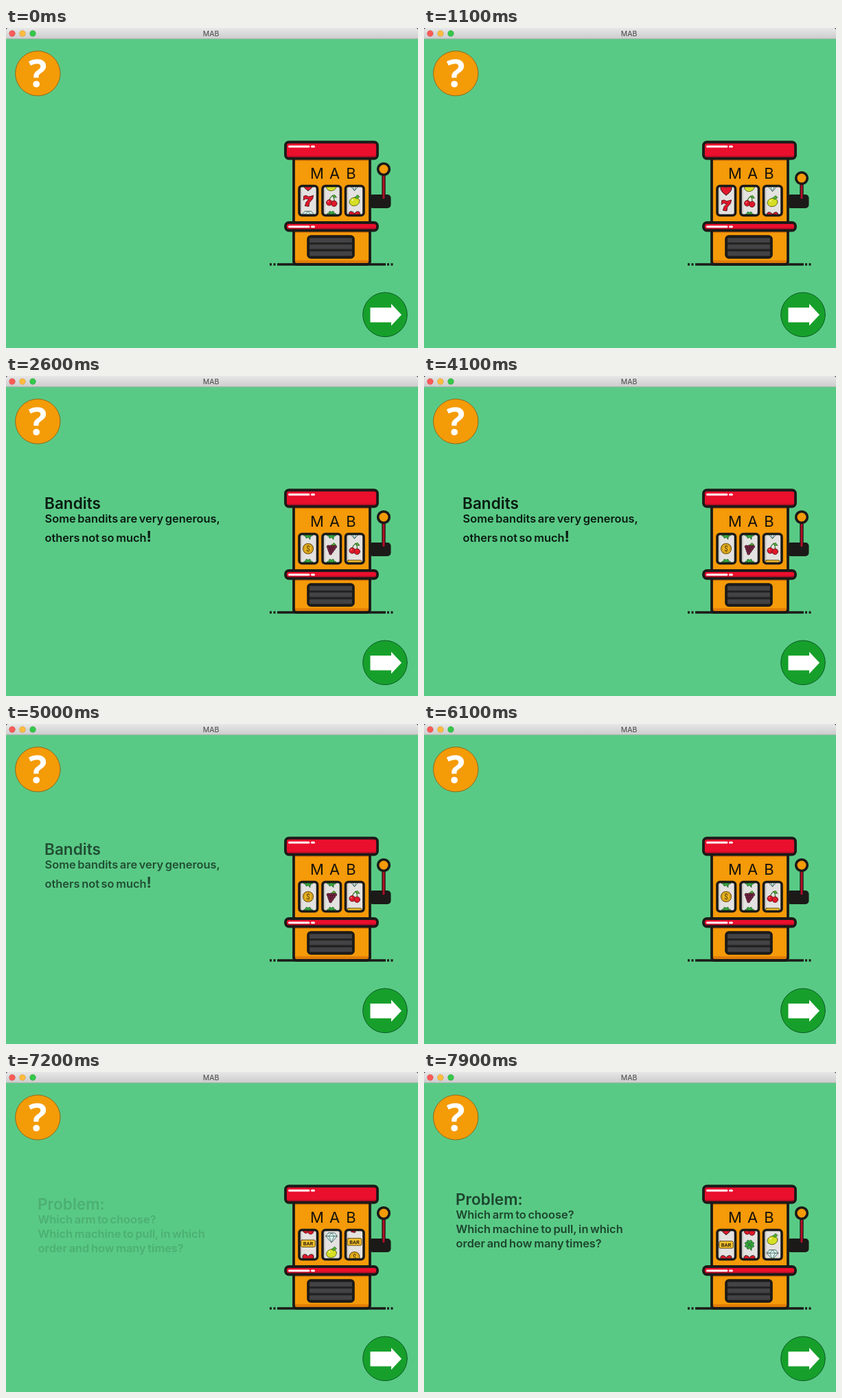
These frames come from a looping animation (600 px wide and 467 px high, 8 s). An HTML page with a canvas:

```html
<!DOCTYPE html>
<html lang="en">
<head>
<meta charset="utf-8">
<title>MAB</title>
<style>
html, body { margin: 0; width: 100%; height: 100%; overflow: hidden; background: #59ca85; }
canvas { display: block; width: 600px; height: 467px; }
</style>
</head>
<body>
<canvas id="stage" width="600" height="467"></canvas>
<script>
const ctx = document.getElementById('stage').getContext('2d');
const LOOP = 8000;
const INK = '#1b1a18', ORANGE = '#f59a08', RED = '#ea0f2d', GREEN = '#59ca85';
const TAU = Math.PI * 2;

const clamp = v => Math.max(0, Math.min(1, v));
const progress = (t, from, to) => clamp((t - from) / (to - from));
const smooth = u => (1 - Math.cos(Math.PI * u)) / 2;

function paint(fill, stroke, width) {
  if (fill) { ctx.fillStyle = fill; ctx.fill(); }
  if (stroke) { ctx.strokeStyle = stroke; ctx.lineWidth = width; ctx.stroke(); }
}
function circle(x, y, r, fill, stroke, width) {
  ctx.beginPath();
  ctx.arc(x, y, r, 0, TAU);
  paint(fill, stroke, width);
}
function box(x, y, w, h, r, fill, stroke, width) {
  ctx.beginPath();
  ctx.roundRect(x, y, w, h, r);
  paint(fill, stroke, width);
}
function poly(points, fill, stroke, width) {
  ctx.beginPath();
  points.forEach(([x, y]) => ctx.lineTo(x, y));
  ctx.closePath();
  paint(fill, stroke, width);
}
function line(x1, y1, x2, y2, color, width, cap = 'butt') {
  ctx.beginPath();
  ctx.lineCap = cap;
  ctx.moveTo(x1, y1);
  ctx.lineTo(x2, y2);
  paint(null, color, width);
}
function write(text, x, y, font, color, align = 'left') {
  ctx.font = font;
  ctx.fillStyle = color;
  ctx.textAlign = align;
  ctx.fillText(text, x, y);
}

function heartPath(size) {
  ctx.beginPath();
  ctx.moveTo(0, size);
  ctx.bezierCurveTo(-size * 1.9, -size * .2, -size * .9, -size * 1.5, 0, -size * .45);
  ctx.bezierCurveTo(size * .9, -size * 1.5, size * 1.9, -size * .2, 0, size);
}

// Reel symbols, each drawn around the origin.
const symbols = {
  7() {
    poly([[-7, -7], [-3, -8], [1, -6], [8, -8], [7, -3], [2, 3], [1, 9], [-5, 8], [-3, 2], [1, -2], [-4, -3], [-7, -1]],
      '#e3172b', '#5a1018', 1);
  },
  H() { heartPath(8); paint('#e3172b', INK, 1); },
  B() {
    box(-11, -5.5, 22, 11, 2, '#f2c12e', '#5b430b', 1);
    write('BAR', 0, 3, '700 8px Roboto, sans-serif', '#33250a', 'center');
  },
  C() {
    ctx.beginPath();
    ctx.moveTo(-4, 2);
    ctx.quadraticCurveTo(-3, -5, 2, -8);
    ctx.quadraticCurveTo(5, -4, 4, 3);
    paint(null, '#2c6b24', 1.2);
    poly([[1, -8], [5, -9], [8, -5], [4, -5]], '#4fae2d', '#24551f', .7);
    circle(-3.5, 3, 4.5, '#e0182a', '#5a1018', .9);
    circle(4, 4.5, 4.5, '#e0182a', '#5a1018', .9);
    circle(-5, 1.5, 1, '#ff8d90');
  },
  G() {
    poly([[-1, -5], [4, -9], [7, -6], [3, -3]], '#4fae2d', '#24551f', .7);
    for (let row = 0; row < 4; row++)
      for (let i = 0; i < 4 - row; i++)
        circle(-5 + i * 3.6 + row * 1.2, -3 + row * 3.4, 2.3, '#7c2745', '#3b1024', .8);
  },
  L() {
    ctx.beginPath();
    ctx.ellipse(0, 1.5, 8, 6.5, -.25, 0, TAU);
    paint('#d6df24', '#596312', 1);
    poly([[0, -5], [5, -9], [8, -6], [4, -3]], '#4fae2d', '#24551f', .7);
    circle(-3, -1, 1.3, '#f3f6a8');
  },
  D() {
    poly([[-5, -7], [5, -7], [9, -2], [0, 8], [-9, -2]], '#d5eee9', '#47625f', 1);
    poly([[-9, -2], [-4, -2], [0, -7], [4, -2], [9, -2], [4, -2], [0, 8], [-4, -2]], null, '#47625f', .8);
    line(-4, -2, 4, -2, '#47625f', .8);
  },
  K() {
    line(0, 1, 3, 9, '#20622a', 1.8);
    for (let i = 0; i < 4; i++) {
      ctx.save();
      ctx.rotate(i * Math.PI / 2);
      ctx.translate(0, -4);
      heartPath(3.6);
      paint('#35a53a', '#1c5726', .8);
      ctx.restore();
    }
  },
  O() {
    circle(0, 0, 8, '#f1bd25', '#654708', 1.1);
    circle(0, 0, 5.8, null, '#a87912', .8);
    write('$', 0, 4, '700 11px Roboto, sans-serif', '#765309', 'center');
  }
};

// Strips run upward; the second entry rests in the window, the next to last stops there.
const SPINS = [1050, 7050];
const REELS = [
  { x: 440, early: .27, mid: 2.9, stop: 800, strips: ['D7HBCGLO7DHBKOK', 'KOKHBC7GLDOGHBH'] },
  { x: 474, early: .02, mid: 2.5, stop: 850, strips: ['KCLDGOH7BKLCKGK', 'KGKLDOCBHG7LHKC'] },
  { x: 507.5, early: .02, mid: 2.8, stop: 1122, strips: ['HLD7GKOCBL7HBCD', 'BCDOB7KHGLCDLH7'] }
];
const PITCH = 22, LAST = 12;

function reelPosition(reel, ms) {
  if (ms <= 50) return reel.early * clamp(ms / 50);
  if (ms <= 150) return reel.early + (reel.mid - reel.early) * (ms - 50) / 100;
  const u = progress(ms, 150, reel.stop);
  return reel.mid + (LAST - reel.mid) * (1 - (1 - u) ** 1.5);
}

function drawReel(reel, t) {
  const spin = t < SPINS[1] ? 0 : 1;
  const pos = reelPosition(reel, t - SPINS[spin]);
  const left = reel.x - 13;
  ctx.save();
  box(left, 230.5, 26.5, 43, 4, '#e4e2e0');
  ctx.clip();
  ctx.fillStyle = '#cbc9c6';
  ctx.fillRect(left, 230, 4, 44);
  [...reel.strips[spin]].forEach((key, i) => {
    const y = 252 + (pos - (i - 1)) * PITCH;
    if (y < 215 || y > 290) return;
    ctx.save();
    ctx.translate(reel.x, y);
    ctx.scale(.94, .94);
    symbols[key]();
    ctx.restore();
  });
  ctx.restore();
  box(left, 230.5, 26.5, 43, 4, null, INK, 3.6);
}

function knobHeight(t) {
  const ms = t % 6000;
  const pull = ms < 800 ? smooth(progress(ms, 100, 750)) : 1 - smooth(progress(ms, 850, 1180));
  return 206 + 97 * pull;
}

function drawLever(t) {
  const y = knobHeight(t);
  const end = y + Math.sign(251 - y) * Math.min(9, Math.abs(251 - y));
  box(529, 243, 31.5, 20, 5, INK);
  line(550, 249, 550, end, INK, 5.4);
  line(550, 249, 550, end, '#b80f27', 2.8);
  circle(550, y, 8.3, ORANGE, INK, 3.6);
}

function ledge(y, h, shine) {
  box(407, y, 134, h, 5, '#c40d28');
  box(407, y, 134, h - 4, 4, RED);
  box(407, y, 134, h, 5, null, INK, 3.8);
  line(412.5, shine, 441, shine, '#fff', 3, 'round');
  line(445.5, shine, 448.5, shine, '#fff', 3, 'round');
}

function drawMachine(t) {
  drawLever(t);
  line(395, 345, 553, 345, INK, 3.4);
  [385.5, 391, 556.5, 562].forEach(x => line(x - 1.5, 345, x + 1.5, 345, INK, 3.4));
  box(419, 182, 111, 163, 4, ORANGE);
  ctx.fillStyle = '#e17d09';
  ctx.fillRect(420, 339, 109, 4);
  ctx.fillRect(420, 191, 109, 3);
  ctx.fillRect(420, 296, 109, 3);
  box(419, 182, 111, 163, 4, null, INK, 3.8);
  ledge(166.5, 24, 173);
  ['M', 'A', 'B'].forEach((letter, i) =>
    write(letter, [453, 478.5, 502.5][i], 219.5, '400 22px Inter, sans-serif', '#17120a', 'center'));
  REELS.forEach(reel => drawReel(reel, t));
  ledge(284, 11.5, 290);
  box(440, 304, 66, 31, 4, '#242323', INK, 3.6);
  [306.5, 316, 326].forEach(y => box(442, y, 62, 6.5, 1, '#434244'));
}

function drawTexts(t) {
  const inFirst = progress(t, 1100, 2250);
  const out = progress(t, 4750, 5600);
  const inSecond = progress(t, 7030, 8180);
  const color = '#0a1b12';
  const title = '600 22.6px Inter, sans-serif';
  const body = '600 16.4px Inter, sans-serif';
  ctx.save();
  ctx.wordSpacing = '-1.5px';
  if (t < 6000) {
    ctx.globalAlpha = inFirst * (1 - out);
    ctx.translate(0, 10 * (1 - inFirst) - 10 * out);
    write('Bandits', 56, 194, title, color);
    write('Some bandits are very generous,', 56.5, 214, body, color);
    write('others not so much', 56.5, 242, body, color);
    write('!', 204.5, 242, '700 22px Inter, sans-serif', color);
  } else {
    ctx.globalAlpha = inSecond;
    ctx.translate(0, 10 * (1 - inSecond));
    write('Problem:', 46, 192, title, color);
    ['Which arm to choose?', 'Which machine to pull, in which', 'order and how many times?']
      .forEach((text, i) => write(text, 46.5, 212 + i * 21, body, color));
  }
  ctx.restore();
}

function drawWindow() {
  ctx.fillStyle = GREEN;
  ctx.fillRect(0, 0, 600, 467);
  const bar = ctx.createLinearGradient(0, 0, 0, 16);
  bar.addColorStop(0, '#e8e7e8');
  bar.addColorStop(1, '#cdcccd');
  ctx.fillStyle = INK;
  ctx.fillRect(0, 0, 600, 8);
  box(0, 0, 600, 16, [3, 3, 0, 0], bar);
  ctx.fillStyle = '#a5b0a8';
  ctx.fillRect(0, 15.3, 600, .9);
  ['#fc5b57', '#fdbc40', '#34c84a'].forEach((color, i) =>
    circle(9 + i * 15, 8, 4.5, color, 'rgba(0,0,0,.15)', .7));
  write('MAB', 298.5, 12, '10.5px Inter, sans-serif', '#444', 'center');
}

function drawButtons() {
  circle(46.3, 66.3, 32.7, '#f49b08', '#8a6a20', 1);
  write('?', 46, 86, '700 56px "Open Sans", sans-serif', '#fff', 'center');
  circle(552, 418.3, 32.3, '#16a02b', '#0b5a24', 1);
  poly([[530.5, 408], [561, 408], [561, 402.5], [576, 418.5], [561, 434.5], [561, 429.5], [530.5, 429.5]], '#fff');
}

function frame(now) {
  const t = now % LOOP;
  drawWindow();
  drawButtons();
  drawTexts(t);
  drawMachine(t);
  requestAnimationFrame(frame);
}
requestAnimationFrame(frame);
</script>
</body>
</html>
```
